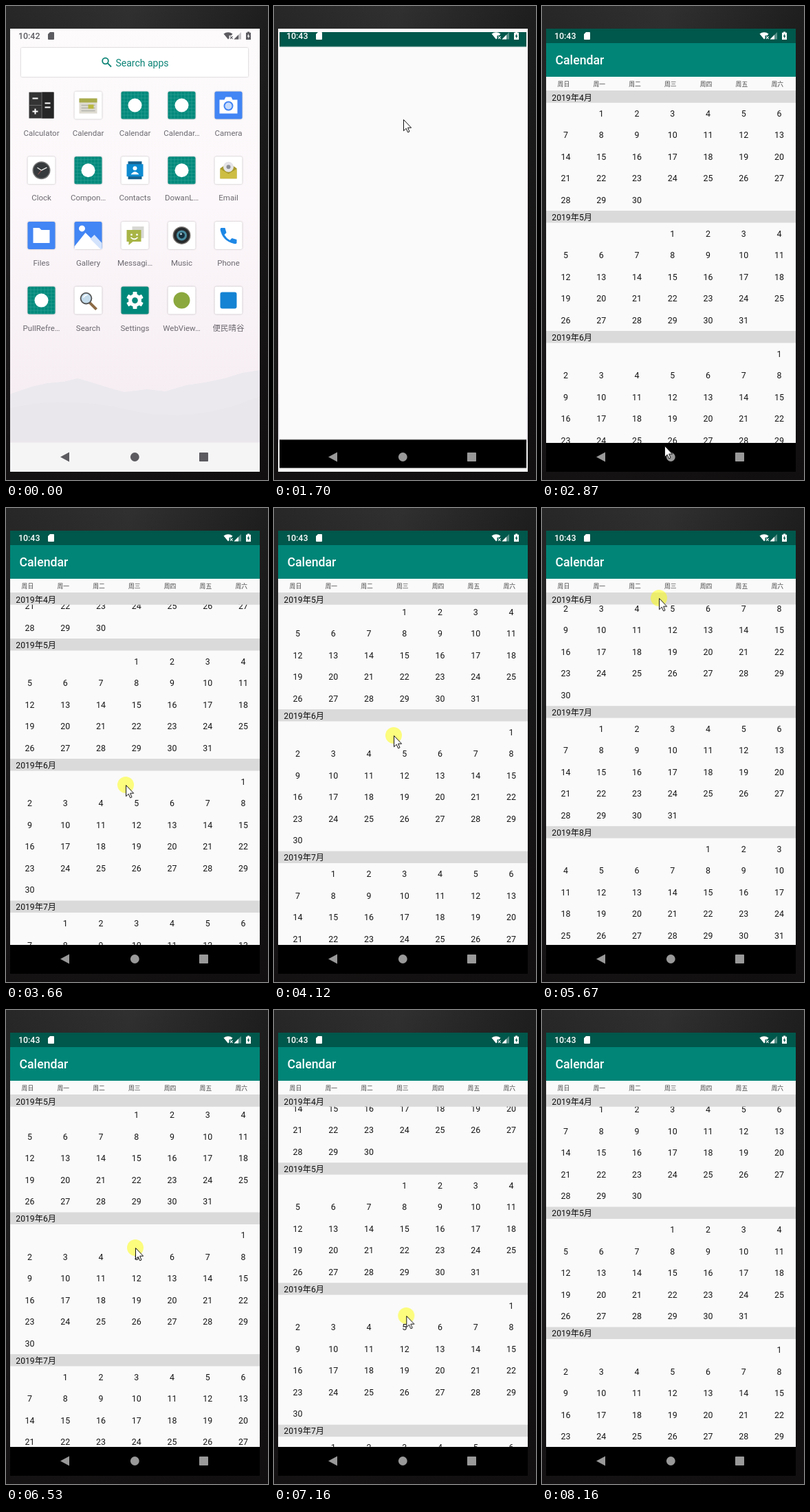
These frames come from a looping animation (381 px wide and 690 px high, 8.79 s). An HTML page:

```html
<!DOCTYPE html>
<html lang="zh-CN">
<head>
<meta charset="utf-8">
<title>Calendar</title>
<style>
html, body { margin: 0; width: 100%; height: 100%; overflow: hidden; background: #1a1a1a; }
svg { display: block; width: 381px; height: 690px; }
text { font-family: Roboto, "Noto Sans CJK SC", "Noto Sans CJK", sans-serif; }
.mid { text-anchor: middle; }
.label { font-size: 11.5px; fill: #6c6a70; }
.day { font-size: 12.4px; fill: #161616; }
.month { font-size: 12.2px; fill: #111; }
.week { font-size: 8.8px; fill: #444; }
.tile { filter: drop-shadow(0 .6px .8px rgba(0, 0, 0, .28)); }

.move { animation: 8790ms linear infinite paused; }
#cursor { animation-name: cursor; }
#halo { animation-name: halo; }
#apps { animation-name: leave; }
#window { animation-name: open; transform-origin: 187.5px 355.5px; }
#calendar { animation-name: appear; }
#list { animation-name: scroll; }
#sticky { animation-name: sticky; }
#bars { animation-name: tint; }
#before { animation-name: before; }
#after { animation-name: after; }

@keyframes cursor {
  0%, .78% { transform: translate(255px, 575px); opacity: 0; }
  .79% { transform: translate(255px, 575px); opacity: 1; }
  10.35% { transform: translate(188px, 163px); }
  11.26%, 23.89% { transform: translate(188px, 165px); }
  29.58% { transform: translate(180px, 645px); }
  32.65% { transform: translate(178px, 640px); }
  34.02% { transform: translate(175px, 518px); }
  41.65% { transform: translate(174px, 403px); }
  53.01% { transform: translate(174px, 246px); }
  63.71% { transform: translate(170px, 127px); }
  64.5% { transform: translate(170px, 131px); }
  74.29% { transform: translate(188px, 346px); }
  85.78%, 86.6% { transform: translate(195px, 507px); }
  92.74% { transform: translate(281px, 692px); opacity: 1; }
  92.75%, 100% { transform: translate(281px, 692px); opacity: 0; }
}
@keyframes halo {
  0%, 10.3% { opacity: 0; }
  10.31%, 13.2% { opacity: .5; }
  13.21%, 34% { opacity: 0; }
  34.01%, 87.47% { opacity: .5; }
  87.48%, 100% { opacity: 0; }
}
@keyframes leave {
  0%, 15.2% { opacity: 1; }
  17.2%, 100% { opacity: 0; }
}
@keyframes open {
  0%, 15.5% { transform: translate(0, -210px) scale(.11, .06); opacity: 0; }
  16.21% { transform: translate(0, -170px) scale(.3, .2); opacity: .6; }
  17.2% { transform: translate(0, -60px) scale(.75, .7); opacity: 1; }
  18.19% { transform: translate(0, -10px) scale(.95, .93); }
  19.18% { transform: scale(.989, .983); }
  20.16%, 100% { transform: none; opacity: 1; }
}
@keyframes appear {
  0%, 22.06% { opacity: 0; }
  22.07%, 100% { opacity: 1; }
}
@keyframes scroll {
  0%, 34.93% { transform: none; }
  41.65% { transform: translateY(-108px); }
  53.01% { transform: translateY(-265px); }
  63.71% { transform: translateY(-395px); }
  64.5% { transform: translateY(-391.5px); }
  74.29% { transform: translateY(-178.5px); }
  85.78%, 100% { transform: translateY(-11.5px); }
}
@keyframes sticky {
  0%, 45.23% { transform: none; }
  46.5%, 58.57% { transform: translateY(-17.5px); }
  60.01%, 66.41% { transform: translateY(-35px); }
  67.21%, 74.53% { transform: translateY(-17.5px); }
  75.73%, 100% { transform: none; }
}
@keyframes tint {
  0%, 18.17% { color: #5c5b60; --nav: #5c5b60; }
  18.18%, 100% { color: #fff; --nav: #999; }
}
@keyframes before { 0%, 18.17% { opacity: 1; } 18.18%, 100% { opacity: 0; } }
@keyframes after { 0%, 18.17% { opacity: 0; } 18.18%, 100% { opacity: 1; } }
</style>
</head>
<body>
<svg viewBox="0 0 381 690">
  <defs>
    <linearGradient id="desk" x2="1" y2=".25">
      <stop offset="0" stop-color="#272727"/><stop offset=".45" stop-color="#303030"/><stop offset="1" stop-color="#1c1c1c"/>
    </linearGradient>
    <linearGradient id="dusk" x2="0" y2="1">
      <stop offset="0" stop-color="#100d0e" stop-opacity="0"/><stop offset="1" stop-color="#100d0e" stop-opacity=".85"/>
    </linearGradient>
    <linearGradient id="sky" x2="0" y2="1">
      <stop offset="0" stop-color="#fdfbfc"/><stop offset=".4" stop-color="#fcf7fa"/><stop offset=".8" stop-color="#f6eef3"/><stop offset="1" stop-color="#f0ecf0"/>
    </linearGradient>
    <pattern id="grid" x="-20" y="-20" width="5" height="5" patternUnits="userSpaceOnUse">
      <path d="M0 4.5H5M4.5 0V5" stroke="#5fb5aa" stroke-width=".5" opacity=".65"/>
    </pattern>
    <clipPath id="screen"><rect x="6" y="33" width="363" height="645"/></clipPath>
    <clipPath id="body"><rect x="6" y="123" width="363" height="513"/></clipPath>
    <clipPath id="strip"><rect x="6" y="123" width="363" height="17.5"/></clipPath>
  </defs>

  <path d="M0 0H381V690H0Z" fill="url(#desk)"/>
  <path d="M0 0H381V690H0Z" fill="url(#dusk)"/>

  <g clip-path="url(#screen)">
    <path d="M6 33H369V678H6Z" fill="url(#sky)"/>
    <path d="M6 565L38 554 60 549 84 547 104 542 128 549 150 556 172 562 205 558 232 561 262 552 290 548 318 542 344 534 369 530V678H6Z" fill="#ebe9ee"/>
    <path d="M6 585Q90 566 180 588T369 568V678H6Z" fill="#e9e7ec" opacity=".6"/>
    <path d="M6 635.5H369V678H6Z" fill="#f5f5f6"/>
    <g id="apps" class="move">
      <rect class="tile" x="22" y="61" width="330" height="42" rx="1" fill="#fff"/>
      <g fill="none" stroke="#0b8376" stroke-width="1.8"><circle cx="144.5" cy="80" r="4.3"/><path d="M147.7 83.2L153 88.5"/></g>
      <text x="159.5" y="87.5" font-size="14" fill="#0b8376">Search apps</text>
    </g>

    <g id="window" class="move">
      <path d="M6 33H369V678H6Z" fill="#fafafa"/>
      <path d="M6 33H369V54H6Z" fill="#00574b"/>
      <path d="M6 636H369V678H6Z"/>
    </g>

    <g id="calendar" class="move">
      <path d="M6 54H369V103H6Z" fill="#008577"/>
      <text x="19.5" y="85.3" font-size="17.7" font-weight="500" fill="#fff">Calendar</text>
      <g id="weekdays"></g>
      <g clip-path="url(#body)"><g id="list" class="move"></g></g>
      <g clip-path="url(#strip)"><g id="sticky" class="move"></g></g>
    </g>

    <g id="bars" class="move" fill="currentColor">
      <g font-size="12.4" font-weight="500">
        <text id="before" class="move" x="18" y="48">10:42</text>
        <text id="after" class="move" x="18" y="48">10:43</text>
      </g>
      <path d="M64 38H69Q70 38 70 39V48Q70 49 69 49H62Q61 49 61 48V41Z"/>
      <path d="M316.5 40.5Q323 35.8 329.5 40.5L327.5 43H324.5V47L323 48.5Z"/>
      <path d="M326 44.2L329.6 47.8M329.6 44.2L326 47.8" stroke="currentColor" stroke-width="1.1"/>
      <path d="M342 38V48.5H331.5Z" opacity=".35"/><path d="M338 42V48.5H331.5Z"/>
      <path fill-rule="evenodd" d="M351 37.5H354V38.7H356V49H349V38.7H351ZM353 40.2L350.7 44.4H352.2V47.5L354.4 43.3H353Z"/>
      <g style="fill: var(--nav)">
        <path d="M92 649.5V663.5L79 656.5Z"/><circle cx="187.3" cy="656.5" r="6.4"/><rect x="281" y="650" width="13" height="13" rx=".8"/>
      </g>
    </g>
  </g>

  <g id="cursor" class="move">
    <circle id="halo" class="move" r="12" fill="#ff0"/>
    <path d="M.5 .5V16.7L4.2 13.2 6.6 18.8 9 17.8 6.6 12.2H11.6Z" fill="#fff" stroke="#111"/>
  </g>
</svg>

<script>
const LOOP = 8790, ROW = 31.5, HEAD = 17.5, TOP = 123;
const $ = id => document.getElementById(id);
const text = (x, y, cls, s) => `<text x="${x}" y="${y}" class="${cls}">${s}</text>`;

// Launcher icons, each drawn around its own centre
const tile = (fill, art = '') => `<rect class="tile" x="-20" y="-20" width="40" height="40" rx="2.5" fill="${fill}"/>${art}`;
const path = (d, fill) => `<path d="${d}" fill="${fill}"/>`;
const line = (d, stroke, w) => `<path d="${d}" fill="none" stroke="${stroke}" stroke-width="${w}"/>`;
const dot = (x, y, r, fill) => `<circle cx="${x}" cy="${y}" r="${r}" fill="${fill}"/>`;
const plain = tile('#00897b', path('M-20-20H20V20H-20Z', 'url(#grid)') + dot(0, 0, 10, '#fff'));
const teeth = [0, 60, 120].map(a => `<rect x="-3" y="-12.5" width="6" height="25" rx="1" fill="#fff" transform="rotate(${a})"/>`).join('');

const apps = [
  ['Calculator', path('M-18-19H18V19H-18Z', '#343434') + path('M1-19H18V19H1Z', '#262626') +
    line('M-18 0H0M.5-19V19', '#777', .8) + line('M-13-10H-5M-13 9H-5M-9 5V13M5-3H13M5 3H13', '#fff', 2)],
  ['Calendar', tile('#fff', path('M-13-10H13V12H-13Z', '#dedbd2') + path('M-13-10H13V-4H-13Z', '#a9ac4c') +
    line('M-10 0H10M-10 4H10M-10 8H10', '#b3b3ac', 1.6) + path('M0-1H8V5H0Z', '#b9b83d'))],
  ['Calendar', plain],
  ['Calendar…', plain],
  ['Camera', tile('#4285f4', path('M-13-8H-6L-4-12H4L6-8H13V12H-13Z', '#fff') + dot(0, 1, 7, '#4285f4') + dot(0, 1, 5, '#c5dafc'))],
  ['Clock', tile('#fff', dot(0, 0, 13, '#777') + dot(0, 0, 11.5, '#373a3c') + line('M-6-4L0 0 8-4', '#eee', 1.3) + line('M0 0L-5 6', '#c66', .7))],
  ['Compon…', plain],
  ['Contacts', tile('#fff', path('M-10-13H10V13H-10Z', '#17628f') + path('M-12-9H12V9H-12Z', '#0d8ad0') +
    dot(0, -3, 3, '#fff') + path('M-6 6Q0-2 6 6Z', '#fff'))],
  ['DowanL…', plain],
  ['Email', tile('#fff', path('M-12-3L0-11 12-3V12H-12Z', '#a89a2c') + dot(0, -5, 7.5, '#e4e4e8') +
    dot(0, -5, 3, '#8b8d95') + path('M-12-2L0 5 12-2V12H-12Z', '#cdbd43'))],
  ['Files', tile('#4285f4', path('M-12-11H-3L0-8H12V11H-12Z', '#fff'))],
  ['Gallery', tile('#4285f4', dot(-9, -10, 4.5, '#fff') + path('M-20 16L-4-4 20 20H-20Z', '#fff') + path('M3 5L9-1 20 11V20H18Z', '#d4e3fc'))],
  ['Messagi…', tile('#fff', path('M-4-13H13V4H-4Z', '#d8d8d4') + path('M-12-8H9V9H-3L-9 14V9H-12Z', '#a8b546') +
    dot(-5, -1, 1.4, '#fff') + dot(3, -1, 1.4, '#fff') + line('M-6 3Q-1 8 4 3', '#fff', 1.5))],
  ['Music', tile('#fff', dot(0, 0, 13, '#77736f') + dot(0, 0, 11.5, '#272a2c') + dot(0, 0, 7.5, '#4a8ca0') + dot(0, 0, 4.5, '#162e3b') + dot(-1, -2, 1.4, '#b8dde7'))],
  ['Phone', tile('#fff', path('M-11-11H-5L-3-4-6-1Q-3 4 2 7L5 4 12 6V11Q11 13 8 12-9 8-12-9Z', '#1e88e5'))],
  ['PullRefre…', plain],
  ['Search', tile('#fff', line('M2 3L12 13', '#8c6b45', 4) + dot(-3, -3, 8.8, '#555') + dot(-3, -3, 7, '#c4dcec') + line('M-7-4Q-5-8-1-8', '#fff', 1.5))],
  ['Settings', tile('#00897b', teeth + dot(0, 0, 9.5, '#fff') + dot(0, 0, 4.3, '#00897b'))],
  ['WebView…', tile('#fff', dot(0, 0, 12, '#8ba83e'))],
  ['便民晴谷', tile('#fff', '<rect x="-12" y="-12" width="24" height="24" rx="3" fill="#1583d3"/>')],
];
$('apps').insertAdjacentHTML('beforeend', apps.map(([name, art], i) => {
  const x = 51.5 + 68 * (i % 5), y = 144.5 + 94.7 * Math.floor(i / 5);
  return `<g transform="translate(${x} ${y})">${art}${text(0, 44.3, 'label mid', name)}</g>`;
}).join(''));

$('weekdays').innerHTML = [...'日一二三四五六']
  .map((c, i) => text(31.4 + 51.8 * i, 116.7, 'week mid', '周' + c)).join('');

const header = (y, month, drop = 0) =>
  `<rect x="6" y="${y}" width="363" height="${HEAD}" fill="#dadada"/>` + text(14.3, y + 13.8 + drop, 'month', `2019年${month}月`);

let y = TOP, list = '';
for (let month = 4; month <= 9; month++) {
  const first = new Date(2019, month - 1, 1).getDay();
  const days = new Date(2019, month, 0).getDate();
  list += header(y, month);
  for (let d = 1; d <= days; d++) {
    const cell = first + d - 1;
    list += text(34.4 + 51.75 * (cell % 7), y + HEAD + ROW * (Math.floor(cell / 7) + .5) + 4.4, 'day mid', d);
  }
  y += HEAD + ROW * Math.ceil((first + days) / 7);
}
$('list').innerHTML = list;
$('sticky').innerHTML = [4, 5, 6].map((m, i) => header(TOP + HEAD * i, m, .7)).join('');

const takes = [[0, 0, 1], [70, 910, 12], [990, 1860, 11], [1940, 2790, 12], [2870, 3740, 12], [3810, 4660, 12],
  [4760, 5600, 12], [5670, 6530, 12], [6610, 7460, 12], [7540, 7540, 1], [7690, 8160, 7]];
function held(t) {
  const [first, last, count] = takes.findLast(take => take[0] <= t);
  if (count === 1) return first;
  const step = (last - first) / (count - 1);
  return first + step * Math.min(count - 1, Math.floor((t - first + 4) / step));
}

const moves = document.getAnimations();
const start = performance.now();
function draw() {
  const t = held((performance.now() - start) % LOOP);
  for (const move of moves) move.currentTime = t;
  requestAnimationFrame(draw);
}
draw();
</script>
</body>
</html>
```
